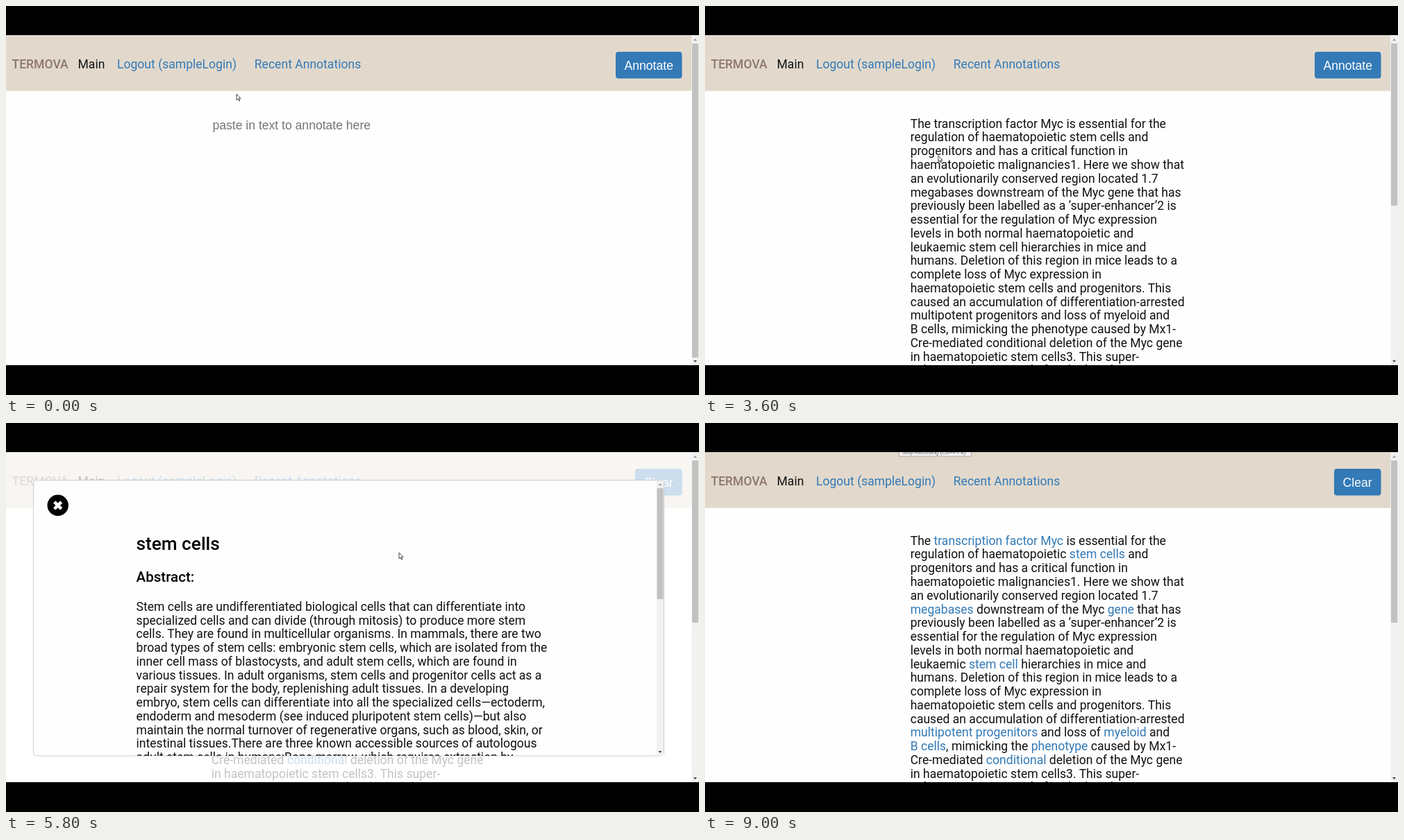
Write an HTML page that moves like this. It is 998 px wide and 561 px high and loops after 9200 ms.

```html
<!DOCTYPE html>
<html lang="en">
<head>
<meta charset="utf-8">
<title>Text annotation demo</title>
<style>
  html, body { margin: 0; width: 100%; height: 100%; overflow: hidden; background: #000; }
  svg { display: block; width: 998px; height: 561px; }
  text { font: 17.57px Roboto, sans-serif; fill: #111; white-space: pre; }
  .ui { font-family: "Liberation Sans", Arial, sans-serif; }
  .link, .linked tspan { fill: #337ab7; }
  .title { font-size: 26.2px; font-weight: 500; fill: #000; }
  .sub { font-size: 20.5px; font-weight: 500; fill: #000; }
  .hot { fill: #fff; text-shadow: 1px 1px 2px #222, 1px 1px 1px #333; text-decoration: underline; }
  .focus { fill: none; stroke: #4a8fdc; stroke-width: 1.3; }
</style>
</head>
<body>
<svg viewBox="0 0 998 561">
  <defs>
    <clipPath id="view"><rect y="42" width="998" height="476"/></clipPath>
    <clipPath id="sheet"><rect x="40" y="83" width="907" height="397"/></clipPath>
    <g id="card">
      <rect y="42" width="987.5" height="476" fill="#fff" opacity=".75"/>
      <rect x="39.5" y="82.5" width="908" height="397.5" rx="4" fill="#fefefe" stroke="#ccc"/>
      <circle cx="74.7" cy="118.8" r="15.2" fill="#000"/>
      <path d="M69.7 113.8l10 10m0-10l-10 10" stroke="#fff" stroke-width="4.6"/>
    </g>
  </defs>
  <rect width="998" height="561"/>
  <g clip-path="url(#view)">
    <rect y="42" width="998" height="476" fill="#fefefe"/>
    <rect y="42" width="987.5" height="80.5" fill="#e2d9cc"/>
    <text x="8.5" y="90" style="font-weight:500;fill:#8d776c">TERMOVA</text>
    <text x="103.5" y="90">Main</text>
    <text x="160" y="90" class="link">Logout (sampleLogin)</text>
    <text x="357.8" y="90" class="link" id="recent">Recent Annotations</text>
    <rect x="358" y="73.5" width="154" height="20.5" class="focus" id="recentFocus"/>

    <g id="annotate">
      <rect x="878" y="66" width="95.5" height="38.5" rx="4" fill="#337ab7"/>
      <text x="890.6" y="91.5" class="ui" style="fill:#fff">Annotate</text>
    </g>
    <g id="clear">
      <rect x="906" y="66" width="67.5" height="38.5" rx="4" fill="#337ab7"/>
      <text x="918.6" y="91.5" class="ui" style="fill:#fff">Clear</text>
    </g>

    <text x="297.5" y="178" class="ui" id="hint" style="fill:#757575">paste in text to annotate here</text>
    <g id="article"></g>
    <path d="M526 197.5h78" stroke="#337ab7" stroke-width="1.2" id="stemLine"/>
    <rect x="525" y="178.8" width="79.7" height="20.6" class="focus" id="stemFocus"/>

    <g id="list">
      <use href="#card"/>
      <text x="189" y="182.5" class="title">Recent Annotations</text>
      <text x="209.5" y="226.7">1.</text>
      <text x="229" y="226.7" class="link" id="entry">The transcription factor...</text>
      <rect x="228.5" y="210" width="197" height="21" class="focus" id="entryFocus"/>
    </g>

    <g id="detail">
      <use href="#card"/>
      <g clip-path="url(#sheet)">
        <text x="187.5" y="182.5" class="title">stem cells</text>
        <text x="187.6" y="229.3" class="sub">Abstract:</text>
        <g id="abstract"></g>
        <g id="innerBar"></g>
      </g>
    </g>

    <g id="pageBar"></g>
    <g id="tip">
      <rect x="279.5" y="30" width="104" height="18" fill="#f4f3f1" stroke="#aaa"/>
      <text x="284" y="45" class="ui" style="font-size:7.6px;fill:#666">Stop Recording (Ctrl+F7-8)</text>
    </g>
    <g id="cursor" fill="#fff" stroke="#333" stroke-width=".9" stroke-linejoin="round">
      <path id="arrow" d="M0 0v8.6l2-1.8 1.5 3.2 1.3-.6-1.4-3.1h2.6z"/>
      <path id="hand" d="M0 .8q.9-1.2 1.7 0v3.4l4 .8q1 .3.8 1.6l-.7 3.6h-4.6l-2.8-3.8q.2-1.2 1.6-.1z"/>
    </g>
  </g>
</svg>
<script>
const article = `The [transcription factor Myc] is essential for the
regulation of haematopoietic [stem cells] and
progenitors and has a critical function in
haematopoietic malignancies1. Here we show that
an evolutionarily conserved region located 1.7
[megabases] downstream of the Myc [gene] that has
previously been labelled as a ‘super-enhancer’2 is
essential for the regulation of Myc expression
levels in both normal haematopoietic and
leukaemic [stem cell] hierarchies in mice and
humans. Deletion of this region in mice leads to a
complete loss of Myc expression in
haematopoietic stem cells and progenitors. This
caused an accumulation of differentiation-arrested
[multipotent progenitors] and loss of [myeloid] and
[B cells], mimicking the [phenotype] caused by Mx1-
Cre-mediated [conditional] deletion of the Myc gene
in haematopoietic stem cells3. This super-
enhancer is composed of multiple enhancer`;

const abstract = `Stem cells are undifferentiated biological cells that can differentiate into
specialized cells and can divide (through mitosis) to produce more stem
cells. They are found in multicellular organisms. In mammals, there are two
broad types of stem cells: embryonic stem cells, which are isolated from the
inner cell mass of blastocysts, and adult stem cells, which are found in
various tissues. In adult organisms, stem cells and progenitor cells act as a
repair system for the body, replenishing adult tissues. In a developing
embryo, stem cells can differentiate into all the specialized cells—ectoderm,
endoderm and mesoderm (see induced pluripotent stem cells)—but also
maintain the normal turnover of regenerative organs, such as blood, skin, or
intestinal tissues.There are three known accessible sources of autologous
adult stem cells in humans:Bone marrow, which requires extraction by`;

const STEP = 200, LOOP = 9200, LEADING = 19.76;
const $ = id => document.getElementById(id);
const show = (id, on) => { $(id).style.display = on ? '' : 'none'; };

function lines(id, copy, x, y) {
  $(id).innerHTML = copy.split('\n').map((line, i) =>
    `<text x="${x}" y="${y + i * LEADING}">` +
    line.replace(/\[(.*?)\]/g, '<tspan>$1</tspan>') + '</text>').join('');
}

function scrollbar(id, x, top, bottom, thumbEnd) {
  const mid = x + 5;
  $(id).innerHTML =
    `<rect x="${x}" y="${top}" width="10.5" height="${bottom - top}" fill="#f1f1f1"/>
     <rect x="${x + .5}" y="${top + 12}" width="9" height="${thumbEnd - top - 12}" fill="#c1c1c1"/>
     <path d="M${mid - 2.5} ${top + 8}h5l-2.5-3z" fill="#999"/>
     <path d="M${mid - 2.5} ${bottom - 7}h5l-2.5 3z" fill="#444"/>`;
}

lines('article', article, 295.7, 175.7);
lines('abstract', abstract, 187.6, 270.8);
scrollbar('innerBar', 937, 82, 480, 254);

// Pointer path: time, x, y
const path = [
  [0, 332, 127], [1000, 412, 79], [2000, 412, 79], [2800, 336, 216],
  [3600, 336, 216], [4600, 566, 187], [6000, 566, 187], [6800, 74, 115],
  [7200, 74, 115], [8200, 180, 210], [8400, 180, 210], [9000, 300, 24], [LOOP, 300, 24]
];

function pointer(t) {
  const i = path.findIndex((p, k) => k && t < p[0]);
  const [t0, x0, y0] = path[i - 1], [t1, x1, y1] = path[i];
  const u = (t - t0) / (t1 - t0), e = u * u * (3 - 2 * u);
  return [x0 + (x1 - x0) * e, y0 + (y1 - y0) * e];
}

let last = -1, barEnd = 0;
function draw(t) {
  const during = (a, b) => t >= a && t < b;
  const loaded = t >= 3600, linked = t >= 3800;
  const overRecent = during(800, 1800);
  const overEntry = during(2800, 3600);
  const overStem = during(4600, 5200);

  show('hint', !loaded);
  show('article', loaded);
  $('article').setAttribute('class', linked ? 'linked' : '');
  show('annotate', !linked);
  show('clear', linked);

  $('recent').setAttribute('class', overRecent ? 'hot' : 'link');
  show('recentFocus', during(1400, 1800));
  $('entry').style.textDecoration = overEntry ? 'underline' : 'none';
  show('entryFocus', during(3000, 3600));
  show('stemLine', overStem);
  show('stemFocus', during(4800, 8200));

  show('list', during(1800, 3600));
  show('detail', during(5200, 7200));
  show('tip', t >= 9000);

  const end = loaded ? 288 : 507;
  if (end !== barEnd) scrollbar('pageBar', 987.5, 42, 518, barEnd = end);

  const hand = overRecent || overEntry || overStem || during(6800, 7200);
  show('hand', hand);
  show('arrow', !hand);
  $('cursor').setAttribute('transform', `translate(${pointer(t)})`);
}

const start = performance.now();
function tick() {
  const t = Math.floor((performance.now() - start) % LOOP / STEP) * STEP;
  if (t !== last) draw(last = t);
  requestAnimationFrame(tick);
}
tick();
</script>
</body>
</html>
```
